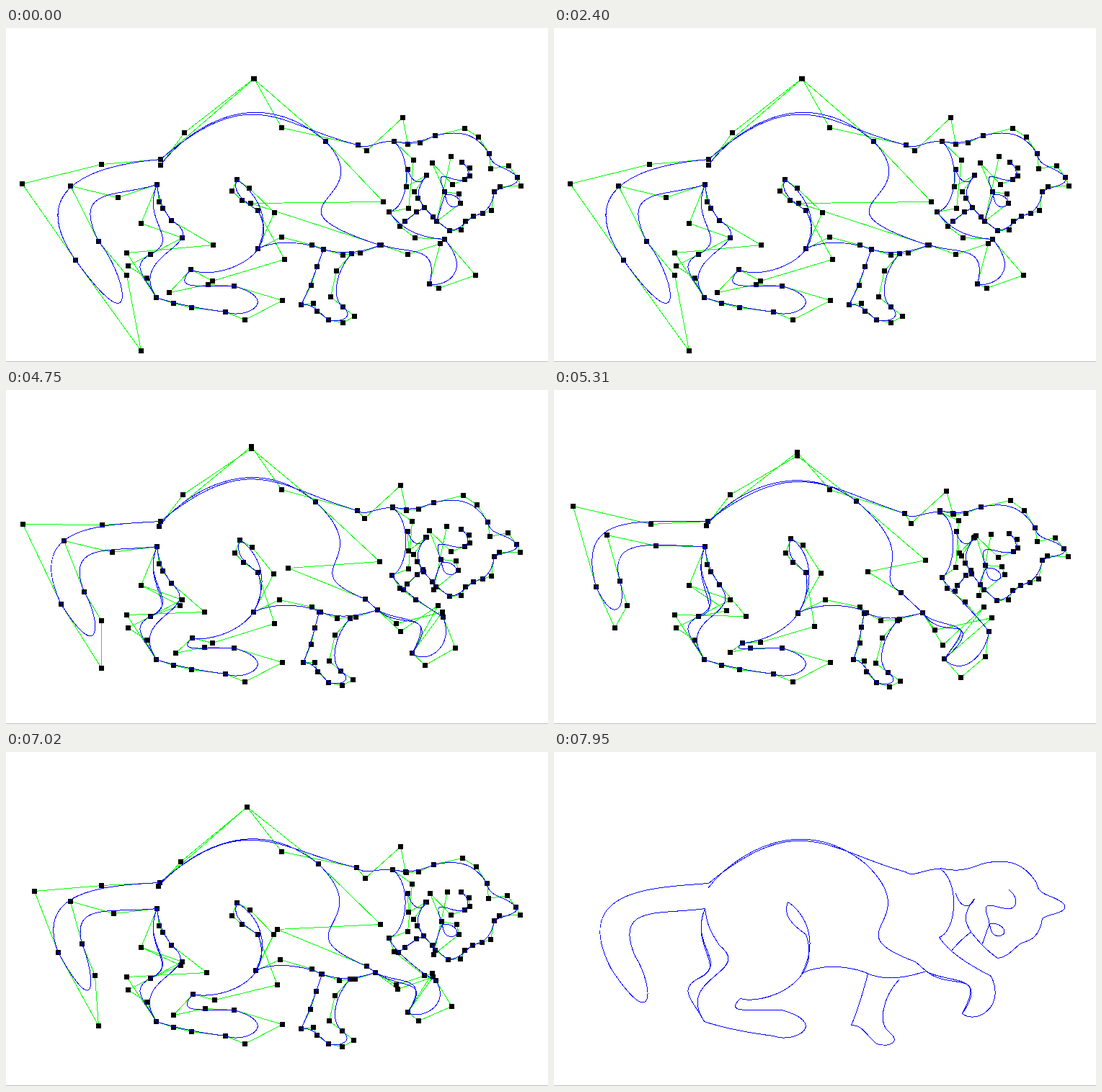
An HTML page for the animation above (8000 ms loop, 752 by 464 pixels).

```html
<!DOCTYPE html>
<html lang="en">
<head>
<meta charset="utf-8">
<title>Bezier cat</title>
<style>
  html, body { margin: 0; width: 100%; height: 100%; overflow: hidden; background: #fff; }
  svg { display: block; width: 752px; height: 464px; }
  path { fill: none; stroke-width: 1; shape-rendering: crispEdges; }
  #cage { stroke: #0f0; }
  #ink { stroke: #00f; }
  #knots { fill: #000; }
  #floor { stroke: #c0c0c0; }
</style>
</head>
<body>
<svg viewBox="0 0 752 464">
  <path id="floor" d="M0 463.5H752"/>
  <g id="handles"><path id="cage"/><path id="knots"/></g>
  <path id="ink"/>
</svg>
<script>
const LOOP = 8000, START = 4190, STEP = 46.45, LEG = 1100, BARE = 7540;

const pairs = text => {
  const n = text.match(/-?\d+/g).map(Number);
  return n.filter((_, i) => i % 2 === 0).map((x, i) => [x, n[2 * i + 1]]);
};
const lerp = ([x, y], [u, v], k) => [x + (u - x) * k, y + (v - y) * k];

// Key shifts are spread evenly along a chain, with straight blends between them.
function drift(points, shifts) {
  const keys = pairs(shifts), last = keys.length - 1;
  return points.map(([x, y], i) => {
    const pos = i / (points.length - 1) * last, k = Math.floor(pos);
    const [dx, dy] = lerp(keys[k], keys[Math.min(k + 1, last)], pos - k);
    return [x + dx, y + dy];
  });
}

// A chain of cubics, and its key shifts for the middle and the high tail pose.
const chains = [];
function chain(path, mid = '0,0', high = mid, show = 'both') {
  const low = pairs(path);
  chains.push({ show, poses: [low, drift(low, mid), drift(low, high)] });
}

// Tail
chain('M214 182C132 189 22 216 96 322C187 448 167 343 128 296C89 219 155 235 209 217',
  '0,1 2,-2 2,-54 -36,-45 -100,-114 -63,-41 -35,-28 -16,-17 -14,-18 0,0',
  '-1,-1 2,-8 46,-57 -60,-112 -151,-175 -113,-84 -59,-76 1,-30 -13,-26 0,0');

// Haunch, back and nape
chain('M214 190C247 145 343 70 443 157', '-2,-1 -2,0 -5,22 -24,-3', '-6,-9 -12,20 -23,18 -24,-3');
chain('M443 157C523 241 339 243 518 301', '-24,-3 -8,-5 96,9 -36,-20', '-24,-3 -8,-5 96,9 -46,-10');
chain('M518 301L520 301', '-36,-20 -8,8', '-46,-10 -20,13', 'line');
chain('M214 182C344 70 382 138 488 162', '0,1 -6,16 0,0 -1,10', '-1,-1 -24,17 0,0 -4,-4');
chain('M488 162C500 170 515 155 538 157', '-1,10 -3,14 -3,12', '-4,-4 0,13 -3,18', 'curve');
chain('M488 162L500 170L550 124L557 161', '-1,10 -6,19 -3,10', '-4,-4 -5,22 -6,14', 'cage');

// Head, from neck round to cheek
chain('M538 157C557 161 574 159 595 149C636 139 655 151 670 174C672 195 697 191 709 207' +
  'C714 219 685 220 677 227C673 253 661 257 648 261C637 268 631 280 615 281' +
  'C597 268 592 262 580 249C571 236 566 227 583 204',
  '-3,10 -2,17 0,9 0,11 -1,1', '-3,16 -7,23 0,19 -3,20 -1,12');
chain('M583 204C575 220 562 214 557 196', '0,0', '0,12 0,0', 'curve');
chain('M583 204L555 220L557 196', '0,0 7,6 1,0', '0,12 8,6 1,0', 'cage');
chain('M538 157C565 183 558 250 531 255', '-3,12 -4,-8 8,5', '-3,17 -4,-7 1,9');
chain('M546 275C553 268 569 255 580 249', '11,4 -2,1', '-3,9 4,10 -2,18');

// Face
chain('M632 186C643 194 643 205 636 210C619 217 591 187 608 227',
  '-1,13 1,14 -9,16', '-1,21 1,25 -10,23');
chain('M597 268C601 256 605 240 609 231C628 228 638 248 620 248C612 247 610 240 608 227',
  '-7,0 -9,16 -9,16 -9,16', '-7,7 -10,23 -10,23 -10,23', 'curve');
chain('M608 227L628 230L630 243L597 268L617 178',
  '-9,16 -4,13 -10,21', '-10,23 -5,27 -11,43', 'cage');

// Raised arm
const innerArm = 'M520 301C557 314 602 299 587 355';
chain(innerArm, '-8,8 -28,19 7,17 -44,19', '-20,13 -39,25 -26,23 -77,16');
chain(innerArm, '-8,8 -17,40 -4,1 -44,19', '-20,13 -34,41 -25,36 -77,16');
chain('M587 355C600 361 651 343 608 293', '-44,19 -34,39 -51,28 -3,41', '-77,16 -70,32 -84,27 -29,64');
chain('M608 293C567 291 546 275 531 255', '-3,41 2,1 1,0 8,5', '-29,64 35,50 -20,6 1,9');

// Belly and standing leg
chain('M349 306C382 290 424 301 440 307C467 315 491 312 520 301',
  '-11,4 0,0 -14,5 -8,8', '-6,-6 0,0 -12,6 -20,13');
chain('M440 307C431 331 423 357 409 384C426 382 431 393 447 405' +
  'C467 409 483 400 467 387C450 373 458 337 479 313',
  '-10,3 7,-10 0,2 -4,6 -2,8', '-3,5 0,0 0,0 -2,0 -4,7');

// Flank fold, thigh and hind foot
chain('M349 253C327 239 313 226 320 210C337 222 372 256 349 306',
  '0,1 9,0 9,-7 -11,5', '0,0 0,3 3,-6 -6,-6');
chain('M349 253C386 321 286 351 256 335', '0,1 -25,7 0,0 5,17', '0,0 -25,7 8,-17 10,5');
chain('M256 335C226 367 280 356 316 358', '5,17 18,-3 -8,2 0,0', '10,5 18,-3 -8,2 0,0');
chain('M316 358C383 378 331 405 304 394C257 388 232 382 208 374');

// Hind leg
chain('M208 374C195 347 169 330 200 314C244 291 187 271 209 217');
chain('M200 314C244 291 187 271 209 217', '0,0 -5,15 0,0 0,0');
chain('M209 217C212 241 217 250 229 267', '0,0 0,3');
chain('M229 267C287 301 167 312 208 374', '0,3 -21,13 0,0 0,0');

// Three held poses, then a steady cycle through them in small steps.
function phaseAt(t) {
  if (t < 1330) return 0;
  if (t < 1790) return 1;
  if (t < 2400) return 2;
  if (t < START) return 0;
  const step = Math.floor((t - START) / STEP + 0.15);
  return (40 + step * STEP) / LEG % 3;
}

const at = ([x, y]) => `${x + 0.5} ${y + 0.5}`;
const polyline = pts => 'M' + pts.map(at).join('L');
const bezier = pts => `M${at(pts[0])}C${pts.slice(1).map(at).join(' ')}`;
const knot = ([x, y]) => `M${x - 3} ${y - 3}h7v7h-7z`;
const snap = ([x, y]) => [Math.floor(x + 1e-6), Math.floor(y + 1e-6)];

const [handles, cage, knots, ink] =
  ['handles', 'cage', 'knots', 'ink'].map(id => document.getElementById(id));

function render(t) {
  const phase = phaseAt(t), leg = Math.floor(phase);
  let lines = '', dots = '', curves = '';
  for (const { poses, show } of chains) {
    const next = poses[(leg + 1) % 3];
    const pts = poses[leg].map((p, i) => snap(lerp(p, next[i], phase - leg)));
    if (show === 'line') curves += polyline(pts);
    else if (show !== 'cage') curves += bezier(pts);
    if (show === 'both' || show === 'cage') {
      lines += polyline(pts);
      dots += pts.map(knot).join('');
    }
  }
  cage.setAttribute('d', lines);
  knots.setAttribute('d', dots);
  ink.setAttribute('d', curves);
  handles.style.display = t < BARE ? '' : 'none';
}

const origin = performance.now();
function tick() {
  render((performance.now() - origin) % LOOP);
  requestAnimationFrame(tick);
}
tick();
</script>
</body>
</html>
```
